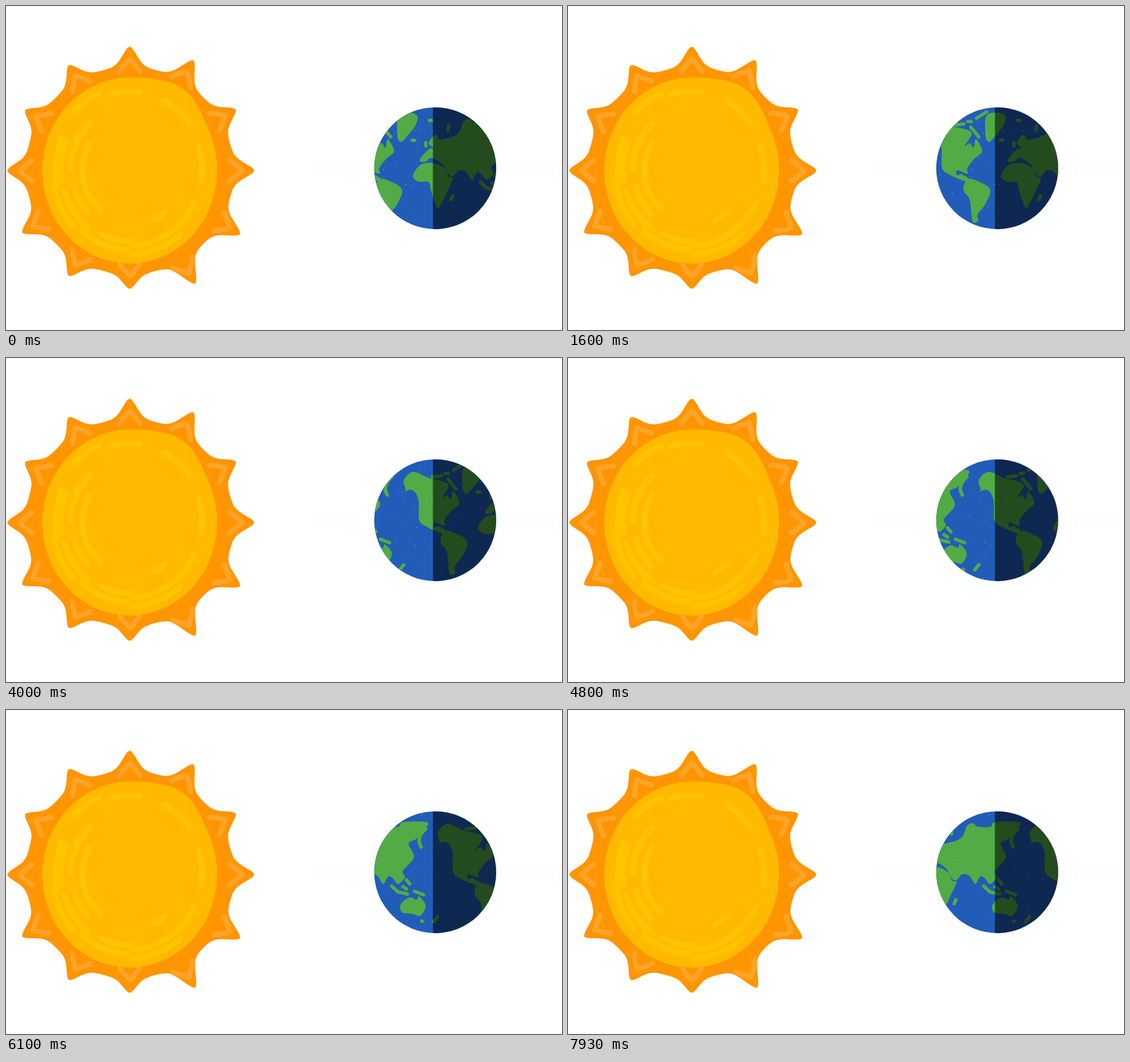
An HTML page that plays this animation: 980 by 572 pixels, repeating every 8 s.

```html
<!DOCTYPE html>
<html lang="id">
<head>
<meta charset="utf-8">
<title>Siang dan malam</title>
<style>
html, body { margin: 0; width: 100%; height: 100%; overflow: hidden; background: #fff; }
svg { display: block; width: 980px; height: 572px; }
text { font: italic 700 32px "Open Sans", "Noto Sans", sans-serif; fill: #fdfdfd; }
.line { fill: none; stroke-linecap: round; stroke-linejoin: round; }
</style>
</head>
<body>
<svg viewBox="0 0 980 572">
  <defs>
    <clipPath id="disc"><circle cx="756.5" cy="286.4" r="107.5"/></clipPath>
    <g id="world"></g>
  </defs>
  <text x="542" y="300">Siang</text>
  <text x="874" y="300">Malam</text>
  <g id="sun"></g>
  <g clip-path="url(#disc)">
    <rect x="648" y="178" width="218" height="218" fill="#215cb8"/>
    <g id="map"></g>
    <rect x="752.5" y="178" width="114" height="218" fill="#000" opacity=".56"/>
  </g>
</svg>
<script>
const NS = 'http://www.w3.org/2000/svg';
const $ = id => document.getElementById(id);
const LAP = 331, STEP = 2.3, LOOP = 8000;

function add(parent, tag, attrs) {
  const el = document.createElementNS(NS, tag);
  for (const k in attrs) el.setAttribute(k, attrs[k]);
  return parent.appendChild(el);
}

// Line through radius(angle) around the middle of the sun, angles in degrees
function polar(from, to, radius, sx = 1, sy = 1) {
  const points = [];
  for (let a = from; a <= to; a++) {
    const t = a * Math.PI / 180, r = radius(a);
    points.push([218 + r * sx * Math.cos(t), 290.5 + r * sy * Math.sin(t)]);
  }
  return 'M' + points.join('L');
}

// Twelve rounded rays, each with a brushed mark
const sun = $('sun');
const rays = [220, 225, 231, 209, 215, 219, 216, 213, 215, 219, 225, 216];
const edge = a => {
  const k = Math.round(a / 30), off = Math.abs(a / 30 - k);
  return 183 + (rays[k % 12] - 183) * Math.exp(-((off / .17) ** 1.6));
};
add(sun, 'path', { d: polar(0, 360, edge) + 'Z', fill: '#ff9500' });

const marks = add(sun, 'g', { class: 'line', stroke: '#ffa428', 'stroke-width': 9 });
rays.forEach((r, k) => {
  const a = k * 30;
  add(marks, 'path', { d: polar(a - 6, a + 6, b => r - 22 - 3.5 * Math.abs(b - a)) });
});

// Face: an oval, fuller at the upper right
const oval = a => 1 + .07 * Math.exp(-(((a - 305) / 18) ** 2));
add(sun, 'path', { d: polar(0, 360, oval, 154, 164) + 'Z', fill: '#ffba00' });

// Brush arcs on the face: size, start and end angle
const shine = add(sun, 'g', { class: 'line', stroke: '#ffc400', 'stroke-width': 10 });
for (const [size, from, to] of [
  [.85, 254, 278], [.85, 298, 323], [.9, 225, 247], [.68, 180, 228], [.54, 130, 212],
  [.79, 172, 203], [.85, 170, 205], [.88, 138, 168], [.78, 128, 163], [.66, 135, 165],
  [.76, 88, 116], [.85, 92, 130], [.9, 50, 88], [.83, -18, 9], [.81, 24, 88], [.6, 48, 63]
]) add(shine, 'path', { d: polar(from, to, () => size, 154, 164) });

// Closed smooth curve through "x,y x,y ..."
function smooth(text) {
  const p = text.trim().split(/\s+/).map(s => s.split(',').map(Number));
  const at = i => p[(i + p.length) % p.length];
  const handle = (i, s) => [0, 1].map(k => at(i)[k] + s * (at(i + 1)[k] - at(i - 1)[k]) / 6);
  return 'M' + at(0) + p.map((_, i) =>
    'C' + [handle(i, 1), handle(i + 1, -1), at(i + 1)].join(' ')).join('') + 'Z';
}

const land = {
  eurasia: `729,272 745,253 754,251 745,242 757,227 766,236 796,226 806,205 817,200 826,206
    848,206 856,198 897,198 897,208 880,227 866,236 875,260 856,284 859,296 847,307 838,297
    830,294 821,307 811,293 798,290 787,301 776,293 770,280 750,268 739,275`,
  africa: `717,300 730,281 750,277 770,284 780,301 788,304 779,325 766,352 759,354 749,325
    745,311 727,310`,
  greenland: '691,195 709,188 725,194 721,212 705,232 696,240 690,230',
  southAmerica: '658,306 676,309 698,324 690,349 676,368 677,379 667,380 662,342 651,325',
  northAmerica: `576,241 589,233 586,216 603,201 631,212 665,223 653,247 662,242 669,250
    673,235 684,256 670,270 658,286 658,296 640,290 640,299 648,297 663,307 653,309 625,297
    613,285 612,250 600,233`,
  australia: '521,343 536,331 549,335 553,329 565,345 556,363 542,360 523,357'
};
const islands = {
  pacific: 'M565 210Q547 226 557 242M505 311L516 321L533 325M525 312l6 4M531 300l6 7' +
    'M545 320l16 6M558 373h1M579 374l7 -9',
  atlantic: 'M784 342l3 -7M740 241v6M716 237h4M746 202h4M780 211l-1 8',
  arctic: 'M637 210l15 -2M659 204h6M674 198l18 -11M664 214l14 17'
};

const world = $('world'), green = '#52ab45';
for (const name in land) add(world, 'path', { d: smooth(land[name]), fill: green });
for (const name in islands)
  add(world, 'path', { d: islands[name], class: 'line', stroke: green, 'stroke-width': 6 });

// Fine specks on sea and land
let seed = 11;
const random = () => (seed = seed * 16807 % 2147483647) / 2147483647;
for (let i = 0; i < 90; i++)
  add(world, 'circle', {
    cx: 600 + random() * LAP, cy: 182 + random() * 208, r: .4 + random() * .4,
    fill: '#d8e8f5', opacity: .7
  });

for (const lap of [-1, 0, 1]) add($('map'), 'use', { href: '#world', x: lap * LAP });

// 12.5 poses a second, shown on a 30 Hz clock
function draw(now) {
  const tick = Math.floor((now % LOOP + 5) * .03);
  const pose = Math.min(99, Math.floor(tick / 2.4 + 1e-6));
  $('map').setAttribute('transform', `translate(${pose * STEP})`);
  requestAnimationFrame(draw);
}
draw(0);
</script>
</body>
</html>
```
